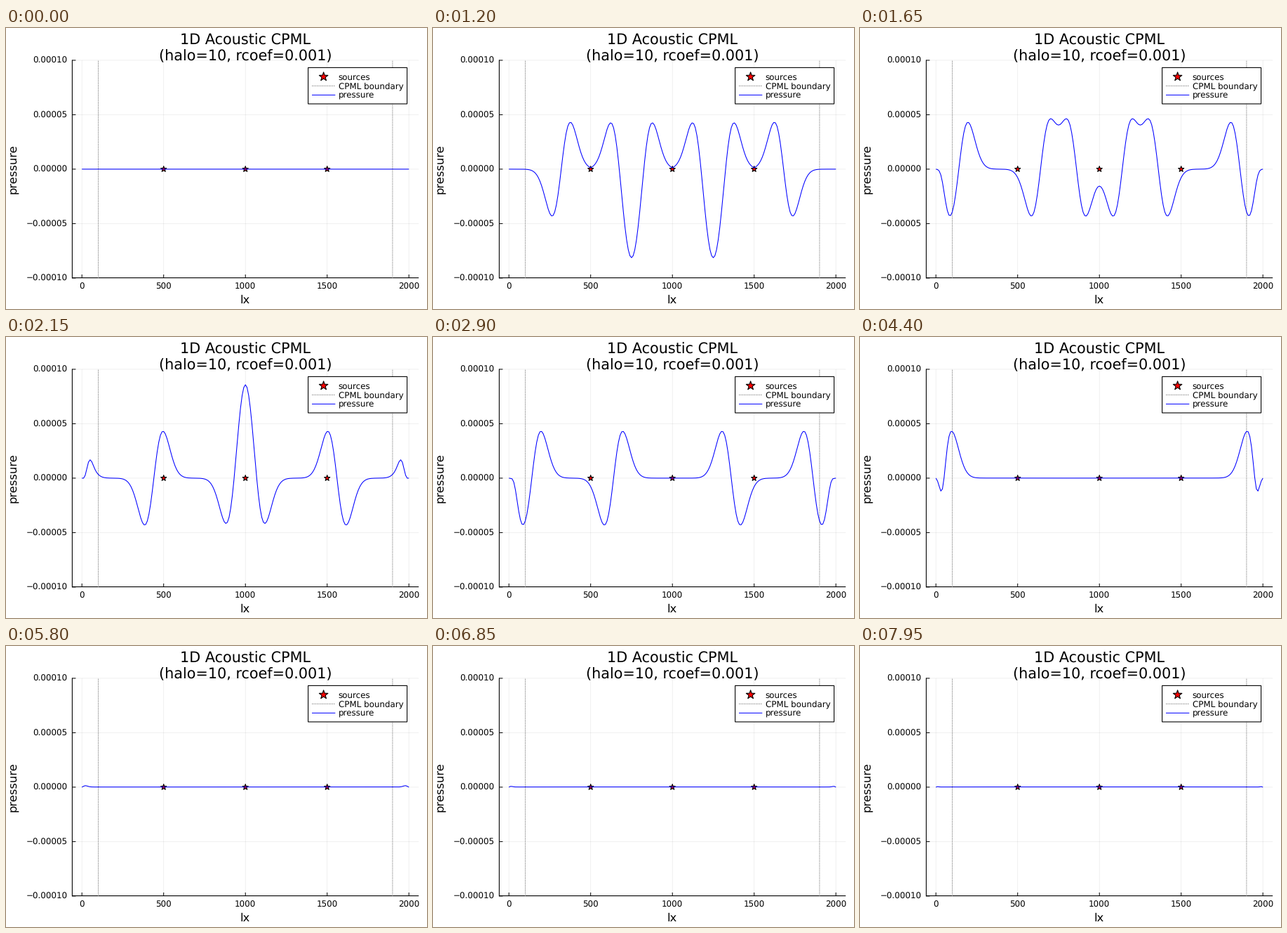
These frames come from a looping animation (600 by 400 pixels, 8000 ms). A matplotlib script:

```python
import numpy as np
import matplotlib.pyplot as plt
from matplotlib.animation import FuncAnimation
from matplotlib.patches import Polygon, Rectangle

plt.rcParams["text.hinting"] = "none"

W, H, DPI = 600, 400, 100
PX = 72 / DPI                      # points per pixel
FRAMES, INTERVAL = 160, 50

# Acoustic medium, Ricker sources and absorbing layer
NX, DX, VEL = 201, 10.0, 2000.0
DT, STEPS = DX / VEL, 2            # time step at the Courant limit, steps per frame
FREQ, DELAY = 8.0, 0.15
HALO, RCOEF = 10, 0.001
SOURCES = (500, 1000, 1500)


def cpml(pos):
    """Recursion coefficients a, b at grid positions given in cells."""
    depth = np.maximum(0, np.maximum(HALO - pos, pos - (NX - 1 - HALO))) / HALO
    d = -3 * VEL * np.log(RCOEF) / (2 * HALO * DX) * depth ** 2
    alpha = np.pi * FREQ * (1 - depth)
    b = np.exp(-(d + alpha) * DT)
    return d * (b - 1) / (d + alpha), b


def ricker(t):
    q = (np.pi * FREQ * (t - DELAY)) ** 2
    return (1 - 2 * q) * np.exp(-q)


def simulate():
    """Pressure snapshots, one per frame."""
    nodes = np.arange(NX)
    a, b = cpml(nodes[1:-1])
    a_half, b_half = cpml(nodes[:-1] + 0.5)
    src = [int(s / DX) for s in SOURCES]
    p, old = np.zeros(NX), np.zeros(NX)
    psi, xi = np.zeros(NX - 1), np.zeros(NX - 2)
    shots = []
    for n in range(FRAMES * STEPS):
        if n % STEPS == 0:
            shots.append(p.copy())
        grad = np.diff(p) / DX
        psi = b_half * psi + a_half * grad
        div = np.diff(grad + psi) / DX
        xi = b * xi + a * div
        new = np.zeros(NX)
        new[1:-1] = 2 * p[1:-1] - old[1:-1] + (VEL * DT) ** 2 * (div + xi)
        new[src] += DT ** 2 * ricker(n * DT)
        old, p = p, new
    return shots


# Plot area in stage pixels
LEFT, RIGHT, TOP, BOTTOM = 94.4, 588.2, 45.95, 355.9
ZERO = (TOP + BOTTOM) / 2
SMALL, MEDIUM, LARGE = 11.9, 16.4, 20.8


def sx(x):
    return 108.2 + 0.233 * np.asarray(x)


def sy(p):
    return ZERO - np.asarray(p) * (BOTTOM - TOP) / 2e-4


fig = plt.figure(figsize=(W / DPI, H / DPI), dpi=DPI, facecolor="white")
ax = fig.add_axes([0, 0, 1, 1])
ax.set_xlim(0, W)
ax.set_ylim(H, 0)
ax.axis("off")


def line(xs, ys, color="black", width=1.0, **kw):
    kw.setdefault("solid_capstyle", "butt")
    return ax.plot(xs, ys, color=color, lw=width * PX, snap=False, **kw)[0]


def dotted(xs, ys, **kw):
    line(xs, ys, "gray", 1.0, ls=(0, (1.3, 1.1)), dash_capstyle="butt", **kw)


def star(x, y, radius, z):
    turn = np.arange(10) * np.pi / 5
    r = radius * np.where(np.arange(10) % 2, 0.4, 1)
    ax.add_patch(Polygon(np.c_[x + r * np.sin(turn), y - r * np.cos(turn)],
                         fc="red", ec="black", lw=1.1 * PX, joinstyle="round",
                         snap=False, zorder=z))


def label(x, y, text, size, ha="center", **kw):
    ax.text(x, y, text, fontsize=size * PX, family="DejaVu Sans", ha=ha,
            va="baseline", color="black", **kw)


# Grid, ticks and tick labels
for v in range(0, 2001, 500):
    x = sx(v)
    line([x, x], [TOP, BOTTOM], width=0.75, alpha=0.08, zorder=1)
    line([x, x], [BOTTOM, BOTTOM - 5], zorder=2)
    label(x, 371.5, str(v), SMALL)
for k in range(-2, 3):
    y = sy(k * 5e-5)
    line([LEFT, RIGHT], [y, y], width=0.75, alpha=0.08, zorder=1)
    line([LEFT, LEFT + 5], [y, y], zorder=2)
    text = f"{k * 5e-5:.5f}".replace("-", "\u2212")
    label(87.6, y + 4.3, text, SMALL, ha="right")

# Axes and titles
line([LEFT, LEFT], [TOP - 0.5, BOTTOM + 0.5], width=1.1, zorder=2)
line([LEFT, RIGHT], [BOTTOM - 0.3] * 2, width=1.1, zorder=2)
label(341.0, 23.7, "1D Acoustic CPML", LARGE)
label(341.0, 46.6, "(halo=10, rcoef=0.001)", LARGE)
label(341.0, 392.5, "lx", MEDIUM)
label(15.6, ZERO, "pressure", MEDIUM, rotation=90, rotation_mode="anchor")

# Sources and layer boundaries
for s in SOURCES:
    star(sx(s), ZERO, 4.3, 3)
for v in (HALO * DX, (NX - 1 - HALO) * DX):
    dotted([sx(v)] * 2, [BOTTOM, TOP], zorder=4)

# Legend
ax.add_patch(Rectangle((430.6, 56.4), 141, 51.6, fc="white", ec="black",
                       lw=1.1 * PX, snap=False, zorder=6))
star(452.6, 69.4, 6.6, 7)
dotted([436, 469.3], [82.4] * 2, zorder=7)
line([436, 469.3], [95.4] * 2, "blue", 1.0, zorder=7)
for i, name in enumerate(("sources", "CPML boundary", "pressure")):
    label(473.7, 73.7 + 13 * i, name, SMALL, ha="left", zorder=7)

shots = simulate()
wave = line(sx(np.arange(NX) * DX), sy(shots[0]), "blue", 1.05, zorder=5,
            solid_joinstyle="round")


def draw(i):
    wave.set_ydata(sy(shots[i]))
    return (wave,)


anim = FuncAnimation(fig, draw, frames=FRAMES, interval=INTERVAL,
                     repeat=True, repeat_delay=0)
plt.show()
```
